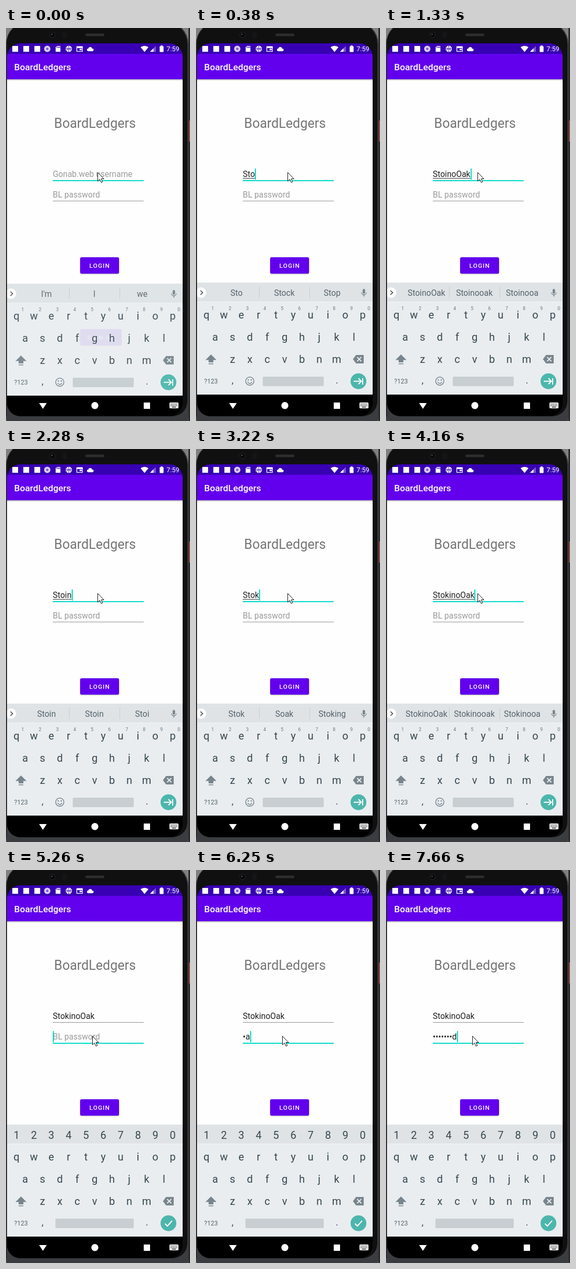
Write an HTML page with a canvas that moves like this. It is 350x744 px and loops after 8 s.

```html
<!DOCTYPE html>
<html lang="en">
<head>
<meta charset="utf-8">
<title>Login</title>
<style>
html, body { margin: 0; width: 100%; height: 100%; overflow: hidden; background: #26282b; }
canvas { display: block; width: 350px; height: 744px; }
</style>
</head>
<body>
<canvas id="stage"></canvas>
<script>
const W = 350, H = 744, LOOP = 8000;
const canvas = document.getElementById('stage');
const dpr = window.devicePixelRatio || 1;
canvas.width = W * dpr;
canvas.height = H * dpr;
const c = canvas.getContext('2d');

const PURPLE = '#6200ee', TEAL = '#03dac5', KEY = '#37474f', ICON = '#78858c';
const APP = 'BoardLedgers';
const FIELD_X = 89, FIELD_SIZE = 15.6;

// [start time, value]: each value holds until the next one
const NAME = [
  [0, ''], [120, 'S'], [240, 'St'], [380, 'Sto'], [670, 'Stoi'], [820, 'Stoin'],
  [940, 'Stoino'], [1210, 'StoinoO'], [1330, 'StoinoOak'], [1880, 'StoinoO'],
  [2000, 'Stoino'], [2280, 'Stoin'], [2400, 'Sto'], [3220, 'Stok'], [3370, 'Stoki'],
  [3490, 'Stokin'], [3610, 'Stokino'], [3910, 'StokinoO'], [4160, 'StokinoOak']
];
const PASS_TIMES = [5960, 6250, 6530, 6680, 7240, 7390, 7510, 7660];
const POINTER = [[0, [174, 273]], [4720, [172, 281]], [4840, [168, 295]], [4990, [164, 314]]];
const CARET = [[0, false], [120, true], [2960, false], [3220, true], [4720, false],
  [5140, true], [5820, false], [5960, true]];
const WORDS = {
  '': ["I'm", 'I', 'we'],
  S: ['S', 'So', 'She'],
  St: ['St', 'Still', 'Start'],
  Sto: ['Sto', 'Stock', 'Stop'],
  Stoi: ['Stoi', 'Stop', 'Stoic'],
  Stok: ['Stok', 'Soak', 'Stoking']
};

function at(track, t) {
  let value = track[0][1];
  for (const [start, v] of track) if (t >= start) value = v;
  return value;
}

function suggest(word) {
  if (WORDS[word]) return WORDS[word];
  const plain = word[0] + word.slice(1).toLowerCase();
  return [word, plain, plain.slice(0, -1)];
}

function rect(x, y, w, h, color, r = 0) {
  c.fillStyle = color;
  c.beginPath();
  c.roundRect(x, y, w, h, r);
  c.fill();
}

function disc(x, y, r, color) {
  c.fillStyle = color;
  c.beginPath();
  c.arc(x, y, r, 0, Math.PI * 2);
  c.fill();
}

function trace(points, closed) {
  c.beginPath();
  points.forEach(([x, y], i) => i ? c.lineTo(x, y) : c.moveTo(x, y));
  if (closed) c.closePath();
}

function poly(points, color) {
  c.fillStyle = color;
  trace(points, true);
  c.fill();
}

function line(points, color, width = 1) {
  c.strokeStyle = color;
  c.lineWidth = width;
  trace(points, false);
  c.stroke();
}

function ring(x, y, r, color, width, from = 0, to = Math.PI * 2) {
  c.strokeStyle = color;
  c.lineWidth = width;
  c.beginPath();
  c.arc(x, y, r, from, to);
  c.stroke();
}

function text(str, x, y, size, color, { align = 'left', weight = 400, spacing = 0 } = {}) {
  c.font = `${weight} ${size}px Roboto, sans-serif`;
  c.letterSpacing = spacing + 'px';
  c.textAlign = align;
  c.fillStyle = color;
  c.fillText(str, x, y);
  return c.measureText(str).width;
}

const centered = (str, x, y, size, color) => text(str, x, y, size, color, { align: 'center' });

function drawBody() {
  rect(0, 0, W, H, '#808080');
  rect(347, 0, 3, H, '#2a2a2c');
  rect(0, -12, 347, 790, '#3a3c3f', 42);
  rect(1, -11, 344, 746, '#101011', [41, 41, 28, 28]);
  rect(0, 29, 2, 706, '#2b2d30');
  rect(348, 175, 2, 40, '#a04a42');
  disc(88.5, 13, 6.5, '#18191b');
  disc(88.5, 13, 4, '#050507');
  disc(87.5, 12, 1.5, '#454a55');
  rect(107, 6, 9, 14, '#151517', 5);
  rect(151, 10.5, 36, 5, '#2d2d2f', 2.5);
}

function drawStatus() {
  const bar = '#3700b3', w = '#fff';
  rect(2, 29, 334, 20, bar);
  rect(12, 34, 11, 11, w);
  rect(33, 34, 11, 11, w);
  rect(54, 34, 11, 11, w);
  disc(78.5, 39.5, 6, '#d9ccf5');
  disc(78.5, 39.5, 2.2, '#7a55cf');
  poly([[97, 34], [103.5, 34], [103.5, 45], [94.5, 45], [94.5, 36.5]], w);
  [97, 99.5, 102].forEach(x => rect(x - 0.5, 35, 1.2, 3, bar));
  disc(119.5, 39.5, 6, w);
  line([[119.5, 33.5], [119.5, 45.5]], bar);
  line([[113.5, 39.5], [125.5, 39.5]], bar);
  ring(112.5, 39.5, 4.5, bar, 1, -1, 1);
  ring(126.5, 39.5, 4.5, bar, 1, 2.1, 4.2);
  rect(134, 34.5, 12, 10.5, w, 1);
  rect(135.3, 38, 9.4, 5.7, bar);
  rect(140, 39, 4, 3, w);
  disc(156.7, 41.3, 2.6, w);
  disc(160.2, 39.3, 3.4, w);
  disc(164.3, 41.5, 2.4, w);
  rect(157, 40, 7.5, 3.9, w);

  c.fillStyle = w;
  c.beginPath();
  c.moveTo(263.5, 45.5);
  c.lineTo(256, 36.3);
  c.quadraticCurveTo(263.5, 31, 271, 36.3);
  c.fill();
  poly([[274, 45], [285, 45], [285, 34]], 'rgba(255,255,255,.35)');
  poly([[274, 45], [280.5, 45], [280.5, 38.5]], w);
  rect(292.3, 34.5, 7.4, 11, w, 1);
  rect(294.3, 33, 3.4, 2, w);
  text('7:59', 305.3, 44, 12.6, w);
}

function drawButton(label, x, y, width) {
  c.save();
  c.shadowColor = 'rgba(0,0,0,.3)';
  c.shadowBlur = 2 * dpr;
  c.shadowOffsetY = dpr;
  rect(x, y, width, 31, PURPLE, 3);
  c.restore();
  text(label, x + width / 2 + 0.3, y + 20, 11.8, '#fff', { align: 'center', weight: 500, spacing: 1.1 });
}

function drawField(value, hint, y, focused, caret) {
  const width = value ? text(value, FIELD_X, y, FIELD_SIZE, '#212121') : 0;
  if (!value) text(hint, FIELD_X, y, FIELD_SIZE, '#9b9b9b');
  rect(FIELD_X, y + 6, 173, focused ? 2 : 1, focused ? TEAL : '#929292');
  if (caret) rect(Math.round(FIELD_X + width), y - 16, 2, 21, TEAL);
  return width;
}

function drawApp(t, inPassword) {
  rect(2, 97, 334, 600, '#fefefe');
  const shade = c.createLinearGradient(0, 97, 0, 100);
  shade.addColorStop(0, 'rgba(0,0,0,.3)');
  shade.addColorStop(1, 'rgba(0,0,0,0)');
  rect(2, 97, 334, 3, shade);
  rect(2, 49, 334, 48, PURPLE);
  text(APP, 15.5, 80, 17.3, '#fff', { weight: 500 });
  centered(APP, 169.2, 189, 25, '#757575');

  const caret = at(CARET, t);
  const width = drawField(at(NAME, t), 'Gonab.web username', 282, !inPassword, caret && !inPassword);
  if (!inPassword && width) rect(FIELD_X, 284, width, 1, '#333');

  const typed = PASS_TIMES.filter(s => t >= s).length;
  const pass = typed ? '•'.repeat(typed - 1) + 'password'[typed - 1] : '';
  drawField(pass, 'BL password', 321, inPassword, caret && inPassword);

  drawButton('LOGIN', 141, 434, 74);
  drawButton('SIGN UP', 141, 570, 79);
}

function drawSuggestions(words) {
  disc(9.5, 501, 10, '#fff');
  line([[8.5, 497], [12.7, 501], [8.5, 505]], '#444', 1.6);
  words.forEach((word, i) => centered(word, 77 + 91 * i, 507, 15.6, '#56646b'));
  [120, 216].forEach(x => rect(x, 490, 1, 21, '#c6ccd0'));
  rect(317, 494, 4.6, 9, ICON, 2.3);
  ring(319.3, 500.5, 4.5, ICON, 1.3, 0, Math.PI);
  rect(318.6, 505, 1.4, 3.5, ICON);
}

function drawKeyboard(words, numeric) {
  rect(2, 482, 334, 212, '#e9edf0');
  rect(2, 482, 334, 36, '#dfe3e6');
  rect(2, 518, 334, 1, '#f2f5f6');
  const digits = '1234567890';
  const keys = (row, x, y) => [...row].forEach((k, i) => centered(k, x + 33 * i, y, 20, KEY));
  if (numeric) keys(digits, 20, 508.5);
  else {
    drawSuggestions(words);
    [...digits].forEach((d, i) => centered(d, 31.7 + 33 * i, 534, 8.8, '#66747b'));
  }
  keys('qwertyuiop', 20, 550);
  keys('asdfghjkl', 36.5, 592);
  keys('zxcvbnm', 69.5, 634);

  poly([[28.5, 618], [39, 628.5], [33, 628.5], [33, 633], [24, 633], [24, 628.5], [18, 628.5]], ICON);
  rect(24, 635, 9, 1.5, ICON);
  poly([[298.5, 627], [304.5, 619], [319, 619], [319, 635], [304.5, 635]], ICON);
  line([[306.5, 623], [314.5, 631]], '#e9edf0', 1.8);
  line([[314.5, 623], [306.5, 631]], '#e9edf0', 1.8);

  centered('?123', 28.5, 673, 12, '#56646b');
  centered(',', 69.5, 673, 18, KEY);
  centered('.', 268, 673, 18, KEY);
  const barX = numeric ? 94 : 127;
  rect(barX, 660, 243 - barX, 18, '#c8ced1', 2);
  disc(309, 668.7, 15, '#4db6ac');
  if (numeric) line([[302.5, 669.5], [307, 674], [316, 664]], '#fff', 2);
  else {
    ring(102.3, 668.5, 7.8, ICON, 1.5);
    disc(99.5, 666.2, 1.2, ICON);
    disc(105.1, 666.2, 1.2, ICON);
    ring(102.3, 669, 4, ICON, 1.4, 0.25, Math.PI - 0.25);
    line([[300, 668.7], [314, 668.7]], '#fff', 2);
    line([[309, 663.2], [314.5, 668.7], [309, 674.2]], '#fff', 2);
    rect(316, 663, 2, 12, '#fff');
  }
}

function drawNav(top) {
  rect(2, top, 334, 735 - top, '#000');
  poly([[63, 710], [77.5, 710], [70.2, 721]], '#fff');
  disc(169, 714.8, 6.7, '#fff');
  rect(262, 709, 12, 12, '#fff');
  rect(311, 709, 17, 11, '#fff', 1.5);
  for (let i = 0; i < 5; i++) {
    rect(313 + i * 2.8, 711, 1.5, 1.5, '#000');
    rect(313 + i * 2.8, 714, 1.5, 1.5, '#000');
  }
  rect(315.5, 717, 8, 1.3, '#000');
}

function drawPointer([x, y]) {
  const shape = [[0, 0], [0, 16.5], [3.9, 13], [6.6, 19], [9.2, 17.8], [6.6, 12], [11.7, 12]]
    .map(([px, py]) => [x + 0.5 + px, y + 0.5 + py]);
  poly(shape, '#fff');
  c.strokeStyle = '#111';
  c.lineWidth = 1;
  c.stroke();
}

function draw(t) {
  const inPassword = t >= 5140, opening = t < 120;
  c.setTransform(dpr, 0, 0, dpr, 0, 0);
  drawBody();

  c.save();
  c.beginPath();
  c.roundRect(2, 29, 334, 706, 25);
  c.clip();
  drawApp(t, inPassword);
  drawStatus();

  c.save();
  if (opening) {
    c.globalAlpha = 0.93;
    c.translate(0, 2);
  }
  // suggestions trail the last deletion
  const word = t >= 2400 && t < 2550 ? 'Stoi' : at(NAME, t);
  drawKeyboard(suggest(word), t >= 5260);
  c.restore();
  drawNav(opening ? 696 : 694);
  c.restore();

  drawPointer(at(POINTER, t));
}

const begin = performance.now();
function tick() {
  draw((performance.now() - begin) % LOOP);
  requestAnimationFrame(tick);
}
tick();
</script>
</body>
</html>
```
